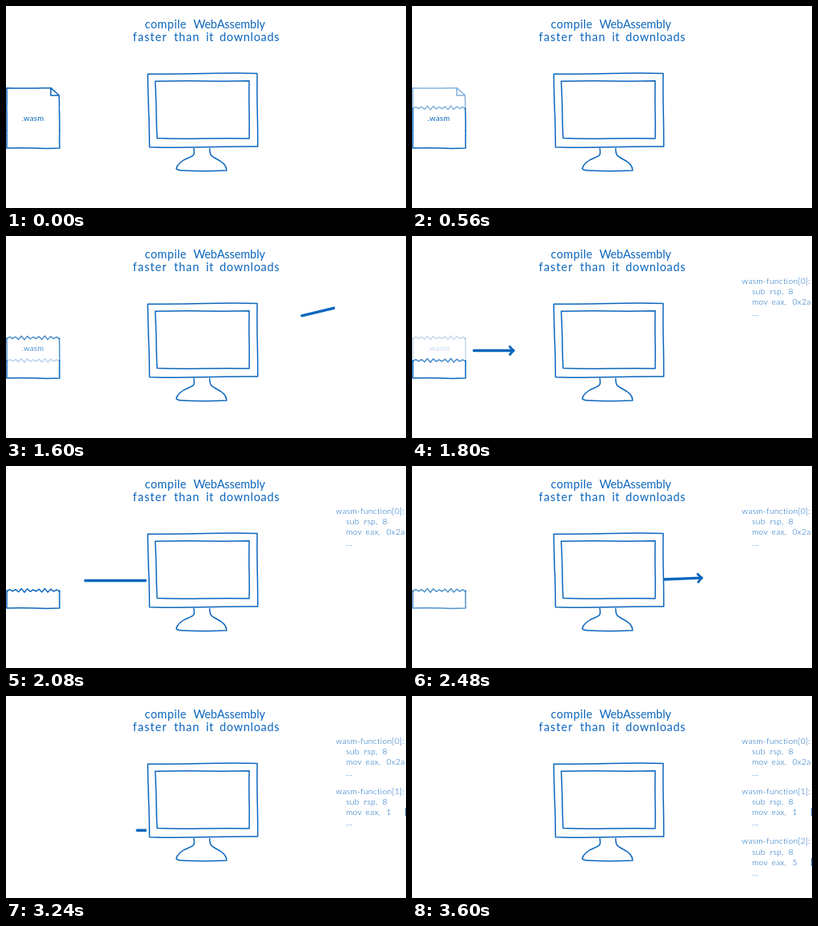
An HTML page that plays this animation: 500 px wide and 253 px high, repeating every 4040 ms.

```html
<!DOCTYPE html>
<html lang="en">
<head>
<meta charset="utf-8">
<title>Streaming compilation</title>
<style>
  html, body { margin: 0; width: 100%; height: 100%; overflow: hidden; background: #fff; }
  svg { display: block; width: 500px; height: 253px; }
  path { fill: none; stroke: #0b66bd; stroke-width: 1.5; stroke-linecap: round; stroke-linejoin: round; }
  text { fill: #0b66bd; font: 300 10.3px Lato, "Open Sans", sans-serif; letter-spacing: .3px; }
  .title { font-size: 14.5px; font-weight: 400; }
  .arrow path { stroke-width: 3.4; }
  .arrow path + path { stroke-width: 2.9; }
</style>
</head>
<body>
<svg id="stage" viewBox="0 0 500 253">
  <defs>
    <clipPath id="before"><rect width="175.6" height="253"/></clipPath>
    <clipPath id="after"><rect x="315" width="96" height="253"/></clipPath>
  </defs>
  <path d="M177.2 85.2 Q215 85.6 248 84.6 T314 84.4 Q313.7 112 314.2 132 T314.7 176 Q280 175.8 246 176.8 T179.4 176.7 Q179.2 150 178.4 132 T177.2 85.2"/>
  <path d="M186.5 94.3 Q220 93.6 248 94 T304 93.8 Q303.6 116 304 132 T304 166 Q280 165.4 246 166 T188.9 165.6 Q188 146 187.8 130 T186.5 94.3"/>
  <path d="M234.8 178.5 C236 186 235.5 187.5 228 190.2 C219 193.5 213.5 199 212.8 203.8 Q214.5 206 220 205.9 Q245 207.4 275.8 206 C275.8 201 272.5 196.2 264 192 C256.5 188.3 254.6 187 254.6 178.5"/>
</svg>
<script>
const LOOP = 4040, STEP = 40;
const stage = document.getElementById('stage');

function add(parent, name, attrs = {}, content = '') {
  const el = document.createElementNS('http://www.w3.org/2000/svg', name);
  for (const key in attrs) el.setAttribute(key, attrs[key]);
  el.textContent = content;
  parent.appendChild(el);
  return el;
}
const line = (parent, d) => add(parent, 'path', { d });
const word = (parent, x, y, content, style = '', cls = '') =>
  add(parent, 'text', { x, y, style, class: cls }, content);
const progress = (t, start, end) => Math.min(1, Math.max(0, (t - start) / (end - start)));

// Title
const title = (x, y, content, spacing) =>
  word(stage, x, y, content, `letter-spacing:${spacing}px`, 'title');
title(173.5, 27.8, 'compile', .4);
title(234.2, 27.8, 'WebAssembly', -.1);
title(158.5, 44.2, 'faster', 1.1);
title(210, 44.2, 'than', .9);
title(250, 44.2, 'it', .6);
title(267, 44.2, 'downloads', .7);

// File, split into three strips by torn edges
function tornEdge(y) {
  let d = `M1 ${y + 1}`;
  for (let i = 1; i <= 18; i++) {
    const dy = (i % 2 ? -1.8 : 1.6) + .7 * Math.sin(i * 2.3);
    d += ` L${(1 + i * 3.66).toFixed(1)} ${(y + dy).toFixed(1)}`;
  }
  return d;
}
const strips = [0, 1, 2].map(() => add(stage, 'g'));
line(strips[0], 'M.9 127 Q1.3 115 .9 102.8 Q28 103.3 55.8 102.4 L66.2 111.8 Q66.8 119 66.6 127 M55.8 102.4 Q56.3 107 55.8 111.9 Q61 112.3 66.2 111.8');
line(strips[1], 'M.9 128 Q1.3 142 1 156 M66.6 128 Q67 142 67 156');
line(strips[2], 'M1 156 Q1.2 168 .9 178 Q20 177.4 36 178.1 T67 178 Q66.7 168 67 156');
word(strips[1], 19.5, 143.5, '.wasm', 'font-size:9.6px;font-weight:400;letter-spacing:.35px');
const edges = [127.6, 156].map(y => line(stage, tornEdge(y)));

// Arrows
function makeArrow(clip) {
  const g = add(stage, 'g', { class: 'arrow', 'clip-path': `url(#${clip})` });
  return { g, shaft: line(g, ''), head: line(g, '') };
}
function drawArrow(arrow, x0, y0, slope, from, tip, visible) {
  arrow.g.style.display = visible ? '' : 'none';
  if (!visible) return;
  const at = x => y0 + (x - x0) * slope;
  const angle = Math.atan(slope) * 180 / Math.PI;
  arrow.shaft.setAttribute('d', `M${from} ${at(from)} L${tip - 1} ${at(tip - 1)}`);
  arrow.head.setAttribute('d', 'M-5.6 -4.9 Q-3 -2 -.7 0 Q-3 2.2 -5.4 5');
  arrow.head.setAttribute('transform', `translate(${tip} ${at(tip)}) rotate(${angle})`);
}

// Compiled functions
function makeCode(y, index, value) {
  const g = add(stage, 'g');
  word(g, 412.3, y, `wasm-function[${index}]:`);
  word(g, 425, y + 13.2, 'sub');
  word(g, 447.5, y + 13.2, 'rsp,');
  word(g, 470.5, y + 13.2, '8');
  word(g, 425, y + 26.4, 'mov');
  word(g, 449.5, y + 26.4, 'eax,');
  word(g, 475.5, y + 26.4, value);
  word(g, 425, y + 39.6, '...');
  if (index) line(g, `M502 ${y + 18} H500 V${y + 27} H502`);
  return g;
}

const parts = [
  { y: 111, outY: 113, slope: -.24, fade: [360, 760], value: '0x2a' },
  { y: 143.5, outY: 142, slope: -.04, fade: [1480, 1900], value: '1' },
  { y: 168.3, outY: 169, slope: .24, fade: [2350, 2810], value: '5' }
].map((part, i) => ({
  ...part,
  incoming: makeArrow('before'),
  outgoing: makeArrow('after'),
  code: makeCode(60 + i * 62.7, i, part.value)
}));

function draw(t) {
  const gone = parts.map(p => progress(t, ...p.fade));
  strips.forEach((strip, i) => strip.style.opacity = 1 - gone[i]);
  edges.forEach((edge, i) => edge.style.opacity = gone[i] * (1 - gone[i + 1]));

  parts.forEach((p, i) => {
    const local = t - i * 940;
    const tail = 77.5 + 103 * progress(local, 920, 1400) ** 2;
    const tip = 76 + .268 * (local - 667);
    drawArrow(p.incoming, 76, p.y, 0, tail, tip, tip > 80 && local < 1400);

    const outTail = 316 + Math.max(0, .9 * (local - 1540));
    const outTip = 315 + 1.2 * (local - 1500);
    drawArrow(p.outgoing, 315, p.outY, p.slope, outTail, outTip, outTip > 317 && outTail < 411);

    p.code.style.opacity = progress(local, 1600, 1720);
  });
}

const start = performance.now();
function tick() {
  const elapsed = (performance.now() - start) % LOOP;
  draw(Math.floor(elapsed / STEP) * STEP);
  requestAnimationFrame(tick);
}
tick();
</script>
</body>
</html>
```
